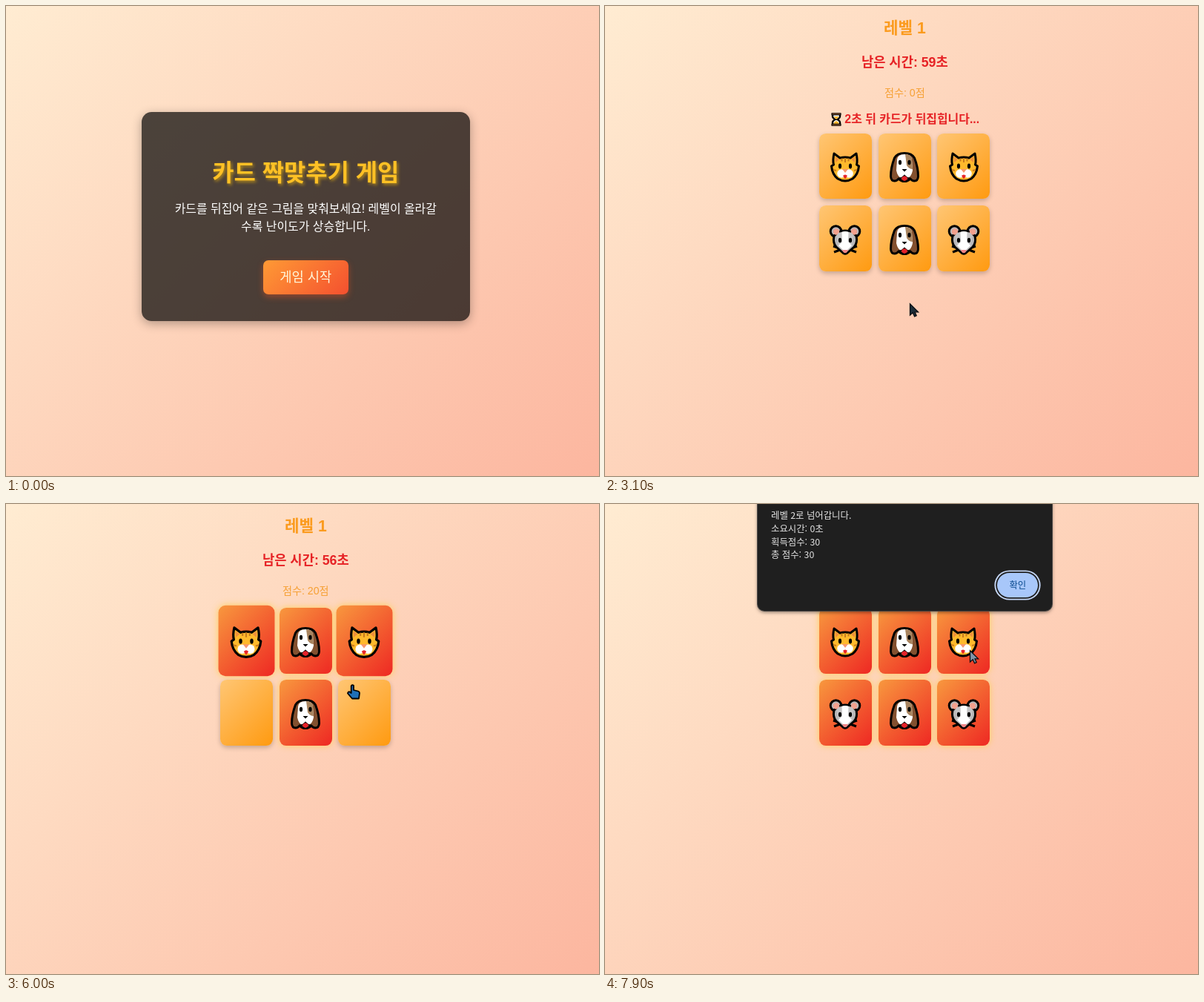
Write an HTML page that moves like this. It is 800 px wide and 634 px high and loops after 8000 ms.

```html
<!DOCTYPE html>
<html lang="ko">
<head>
<meta charset="utf-8">
<title>카드 짝맞추기 게임</title>
<style>
html, body { margin: 0; width: 100%; height: 100%; overflow: hidden; }
body { font-family: "Liberation Sans", "Noto Sans CJK KR", sans-serif; }
#stage { position: relative; width: 800px; height: 634px; overflow: hidden;
  background: linear-gradient(135deg, #ffecd2, #fcb69f); }
#stage div, #stage svg { position: absolute; white-space: nowrap; }
svg { overflow: visible; }
.line { left: 204.3px; width: 400px; height: 24px; line-height: 24px; text-align: center; }
#panel { left: 183px; top: 142.5px; width: 442.5px; height: 282.5px; border-radius: 13.3px;
  background: rgba(0, 0, 0, .7); box-shadow: 0 3.5px 13.3px rgba(0, 0, 0, .3); }
#panel .line { left: 21.3px; }
#title { top: 70px; font-weight: bold; font-size: 31.86px; color: #ffc125;
  text-shadow: 1.8px 1.8px 4.4px rgba(255, 193, 7, .6); }
#intro { top: 119.4px; font-size: 15.93px; color: #fff; }
#intro.line { line-height: 23.7px; }
#start { left: 163.8px; top: 200.3px; width: 115px; height: 46.5px; line-height: 47.5px;
  border-radius: 7px; text-align: center; font-size: 17.7px; color: #fff8dc;
  background: linear-gradient(135deg, #ff9a35, #f4502f);
  box-shadow: 0 3.5px 8.8px rgba(255, 87, 34, .4); }
#level { top: 18.2px; font-weight: bold; font-size: 21.24px; color: #fb9b1e; }
#timer { top: 63.5px; font-weight: bold; font-size: 17.7px; color: #e62326; }
#score { top: 104.5px; font-size: 14.16px; color: #f6a034; }
#notice { left: 0; top: 0; font-weight: bold; font-size: 15.93px; color: #e62326; }
#notice .line { left: 323.3px; top: 141px; text-align: left; }
.card { width: 70.8px; height: 88.5px; border-radius: 8.9px;
  background: linear-gradient(135deg, #ffc674, #ff9a10);
  box-shadow: 0 2.7px 6px rgba(0, 0, 0, .22); }
.card.hover { background: linear-gradient(135deg, #ff9820, #ff7648);
  box-shadow: 0 3.5px 8px rgba(0, 0, 0, .25); }
.card.matched { background: linear-gradient(135deg, #f8983e, #ee2823);
  box-shadow: 0 0 9px rgba(255, 205, 70, .85); }
.card svg { left: 35.4px; top: 44.5px; width: 1px; height: 1px; }
#dialog { left: 206px; top: -20px; width: 397px; height: 164px; border-radius: 9px;
  background: #1f1f1f; box-shadow: 0 0 0 1px #4a4644, 0 2px 5px rgba(0, 0, 0, .5);
  font: 12.39px/17.7px "Noto Sans CJK KR", sans-serif; color: #e3e3e3; }
#lines { left: 18px; top: 27.3px; }
#ok { left: 323.3px; top: 112.5px; width: 55px; height: 33px; line-height: 32px; border-radius: 17px;
  text-align: center; background: #a8c7fa; color: #0a4a8f;
  box-shadow: 0 0 0 1.8px #1f1f1f, 0 0 0 3.6px #c8dafa; }
</style>
</head>
<body>
<div id="stage">
  <div id="panel">
    <div id="title" class="line">카드 짝맞추기 게임</div>
    <div id="intro" class="line">카드를 뒤집어 같은 그림을 맞춰보세요! 레벨이 올라갈<br>수록 난이도가 상승합니다.</div>
    <div id="start">게임 시작</div>
  </div>
  <div id="game">
    <div id="level" class="line">레벨 1</div>
    <div id="timer" class="line"></div>
    <div id="score" class="line"></div>
    <div id="notice">
      <svg width="1" height="1" style="left:311.5px;top:152.5px">
        <path d="M-5-7H5V-4Q5-2 1.5 0Q5 2 5 4V7H-5V4Q-5 2-1.5 0Q-5-2-5-4Z" fill="#fff" stroke="#000" stroke-width="2.4"/>
        <path d="M-3.5-4H3.5L0 0ZM-3.8 6Q-3 3 0 2Q3 3 3.8 6Z" fill="#f8b62c"/>
        <path d="M-6.5-7.3H6.5M-6.5 7.3H6.5" stroke="#000" stroke-width="3"/>
        <path d="M-5.5-7.3H5.5M-5.5 7.3H5.5" stroke="#a5683a" stroke-width="1"/>
      </svg>
      <div id="countdown" class="line"></div>
    </div>
    <div id="cards" style="left:0;top:0"></div>
  </div>
  <div id="dialog">
    <div id="lines">레벨 2로 넘어갑니다.<br>소요시간: 0초<br>획득점수: 30<br>총 점수: 30</div>
    <div id="ok">확인</div>
  </div>
  <svg id="pointer" width="1" height="1" style="left:0;top:0">
    <path id="hand" d="M-1.3 1.5Q0-1 2 1V7L8 8.5Q10 9.2 10 11L9 18.5H0L-6 11.5Q-5.5 8.5-3 9.5L-1.3 11Z" fill="#1f6fb8" stroke="#000" stroke-width="1.8" stroke-linejoin="round"/>
    <path id="arrow" d="M.5.8V16L4.2 12.8L6.6 17.8L9.2 16.6L7 11.8H11.6Z" stroke="#0a0f14" stroke-width="1.3"/>
  </svg>
</div>

<svg width="0" height="0" style="position:absolute">
  <defs>
    <g id="cat">
      <path d="M-15-17L-7-11Q0-13 7-11L15-17Q17-8 15.5-2L18.5 0Q17.5 11 10 17Q0 23-10 17Q-17.5 11-18.5 0L-15.5-2Q-17-8-15-17Z" fill="#ffb92c" stroke="#000" stroke-width="3" stroke-linejoin="round"/>
      <path d="M-13.5-13L-8-9L-13-5ZM13.5-13L8-9L13-5Z" fill="#ef8f3c"/>
      <path d="M0-11V-5M-4.5-10.5V-6.5M4.5-10.5V-6.5M-16 5L-12 6M16 5L12 6" stroke="#c87a1e" stroke-width="2"/>
      <g fill="#fff"><circle cx="-5" cy="10" r="5.8"/><circle cx="5" cy="10" r="5.8"/></g>
      <path d="M-4 4H4L0 9Z" fill="#f7976e"/>
      <path d="M-3 13Q0 10 3 13L0 17.5Z" fill="#e8262a"/>
      <ellipse cx="-7" cy="0" rx="2.1" ry="3.4"/><ellipse cx="7" cy="0" rx="2.1" ry="3.4"/>
    </g>
    <g id="dog">
      <path d="M0-17.5Q10-17.5 13.5-11Q18.5 2 18.5 14Q18 20 13.5 20Q10 20 8 17Q4 20.5 0 20.5Q-4 20.5-8 17Q-10 20-13.5 20Q-18 20-18.5 14Q-18.5 2-13.5-11Q-10-17.5 0-17.5Z" fill="#83502f" stroke="#000" stroke-width="3" stroke-linejoin="round"/>
      <path d="M0-16Q9-16 10-9L11 6Q9 15 4 16H-4Q-9 15-11 6L-10-9Q-9-16 0-16Z" fill="#fff"/>
      <path d="M1-16Q9-16 10-9L11 4Q6 4 3-1Z" fill="#a8845f"/>
      <path d="M-8 16Q-4 17 0 12.5Q4 17 8 16" fill="none" stroke="#000" stroke-width="1.6"/>
      <path d="M-3.8 15.5Q0 11 3.8 15.5Q4 19 0 20Q-4 19-3.8 15.5Z" fill="#e5222a"/>
      <path d="M-3.5 4H3.5L0 7.5Z"/>
      <ellipse cx="-6" cy="-5" rx="2.1" ry="3.3"/><ellipse cx="6.5" cy="-5" rx="2.1" ry="3.3"/>
    </g>
    <g id="mouse">
      <path d="M-7 13L-16 10M-7 15L-15 18M7 13L16 10M7 15L15 18" stroke="#000" stroke-width="3.2"/>
      <g fill="#b9b7b8" stroke="#000" stroke-width="3">
        <circle cx="-12.5" cy="-10" r="7.3"/><circle cx="12.5" cy="-10" r="7.3"/>
        <path d="M-9-9Q0-13 9-9L15-4Q17 6 12 11L2.5 19.5Q0 21-2.5 19.5L-12 11Q-17 6-15-4Z" stroke-linejoin="round"/>
      </g>
      <g fill="#f2a08d"><circle cx="-12" cy="-9.5" r="4.2"/><circle cx="12" cy="-9.5" r="4.2"/></g>
      <path d="M-9-8Q0-11 9-8L12-4Q10 0 9.5 10L0 18L-9.5 10Q-10 0-12-4Z" fill="#c5c3c4"/>
      <path d="M-4.5-9.3Q0-10.5 4.5-9.3L4 4L9 9L0 18L-9 9L-4 4Z" fill="#fff"/>
      <path d="M-4 15H4L2 18.5Q0 20-2 18.5Z" fill="#ef8585"/>
      <ellipse cx="-7" cy="2" rx="2.1" ry="3.3"/><ellipse cx="7" cy="2" rx="2.1" ry="3.3"/>
    </g>
  </defs>
</svg>

<script>
const LOOP = 8000, STEP = 100;
const GAME_START = 1200, CARDS_HIDDEN = 4200, ALERT = 7700;
const CARD_W = 70.8, CARD_H = 88.5, NOTICE_H = 31.9;
const $ = id => document.getElementById(id);
const show = (element, visible) => element.style.display = visible ? '' : 'none';

// Face and opening time of each card, row by row.
const deck = [['cat', 5500], ['dog', 4700], ['cat', 5900], ['mouse', 6800], ['dog', 5200], ['mouse', 6300]];
const matchTime = { dog: 5200, cat: 5900, mouse: 6800 };

// Pointer stops: time, x, y.
const route = [
  [300, 604, 570], [1100, 428, 350], [2200, 428, 350], [3100, 411, 401], [4200, 411, 401],
  [4600, 402, 190], [4700, 402, 190], [4900, 400, 262], [5100, 400, 272], [5200, 400, 274],
  [5500, 322, 190], [5600, 326, 190], [5800, 480, 188], [5900, 478, 204], [6000, 467, 244],
  [6200, 478, 280], [6300, 476, 282], [6600, 328, 282], [6800, 326, 284], [7300, 354, 400],
  [7600, 354, 400], [7900, 492, 197]
];

const cards = deck.map(([face, opened], i) => {
  const element = document.createElement('div');
  element.innerHTML = `<svg><use href="#${face}"/></svg>`;
  $('cards').append(element);
  return { element, face, opened, x: 289.1 + i % 3 * 79.65, y: 140 + Math.floor(i / 3) * 97.35 };
});

function pointerAt(t) {
  const next = route.findIndex(stop => stop[0] >= t);
  if (next < 1) return route[next < 0 ? route.length - 1 : 0].slice(1);
  const [t0, x0, y0] = route[next - 1], [t1, x1, y1] = route[next];
  const u = (t - t0) / (t1 - t0), k = u * u * (3 - 2 * u);
  return [x0 + (x1 - x0) * k, y0 + (y1 - y0) * k];
}

function pointerInside(t, x, y, w, h) {
  const [px, py] = pointerAt(t);
  return px >= x && px <= x + w && py >= y && py <= y + h;
}

const overStart = t => t >= 300 && t < GAME_START && pointerInside(t, 347, 343, 115, 46.5);
const cardTop = (card, t) => card.y + (t < CARDS_HIDDEN ? NOTICE_H : 0);
const overCard = (card, t) => t >= GAME_START && t < ALERT &&
  pointerInside(t, card.x, cardTop(card, t), CARD_W, CARD_H);

// Hover reacts one step late and grows over two steps.
const hoverAmount = over => (over(STEP) + over(2 * STEP)) / 2;

function drawCard(card, t) {
  const { element, face, opened, x } = card;
  const sinceMatch = t - matchTime[face], matched = sinceMatch >= 0;
  const hovered = !matched && overCard(card, t - STEP);
  let scale = 1 + .1 * hoverAmount(delay => overCard(card, t - delay));
  if (matched) scale = sinceMatch < 400 ? 1 + .1 * Math.sin(Math.PI * sinceMatch / 400) : 1;
  element.className = 'card' + (matched ? ' matched' : hovered ? ' hover' : '');
  element.style.left = x + 'px';
  element.style.top = cardTop(card, t) + 'px';
  element.style.transform = `scale(${scale})`;
  show(element.firstChild, t < CARDS_HIDDEN || t >= opened);
}

function drawPointer(t) {
  const [x, y] = pointerAt(t);
  const hand = overStart(t) || cards.some(card => overCard(card, t));
  show($('pointer'), t >= 300);
  $('pointer').style.transform = `translate(${x}px, ${y}px)`;
  show($('hand'), hand);
  show($('arrow'), !hand);
  $('arrow').setAttribute('fill', t >= ALERT ? '#8095a8' : '#1e2d38');
}

function draw(now) {
  const t = Math.floor(now % LOOP / STEP) * STEP;
  const playing = t >= GAME_START;
  const seconds = Math.floor((t - GAME_START) / 1000);
  const pairs = Object.values(matchTime).filter(time => t >= time).length;
  show($('panel'), !playing);
  show($('game'), playing);
  show($('notice'), t < CARDS_HIDDEN);
  show($('dialog'), t >= ALERT);
  $('start').style.transform = `scale(${1 + .05 * hoverAmount(delay => overStart(t - delay))})`;
  $('timer').textContent = `남은 시간: ${60 - seconds}초`;
  $('score').textContent = `점수: ${pairs * 10}점`;
  $('countdown').textContent = `${3 - seconds}초 뒤 카드가 뒤집힙니다...`;
  cards.forEach(card => drawCard(card, t));
  drawPointer(t);
  requestAnimationFrame(draw);
}
requestAnimationFrame(draw);
</script>
</body>
</html>
```
